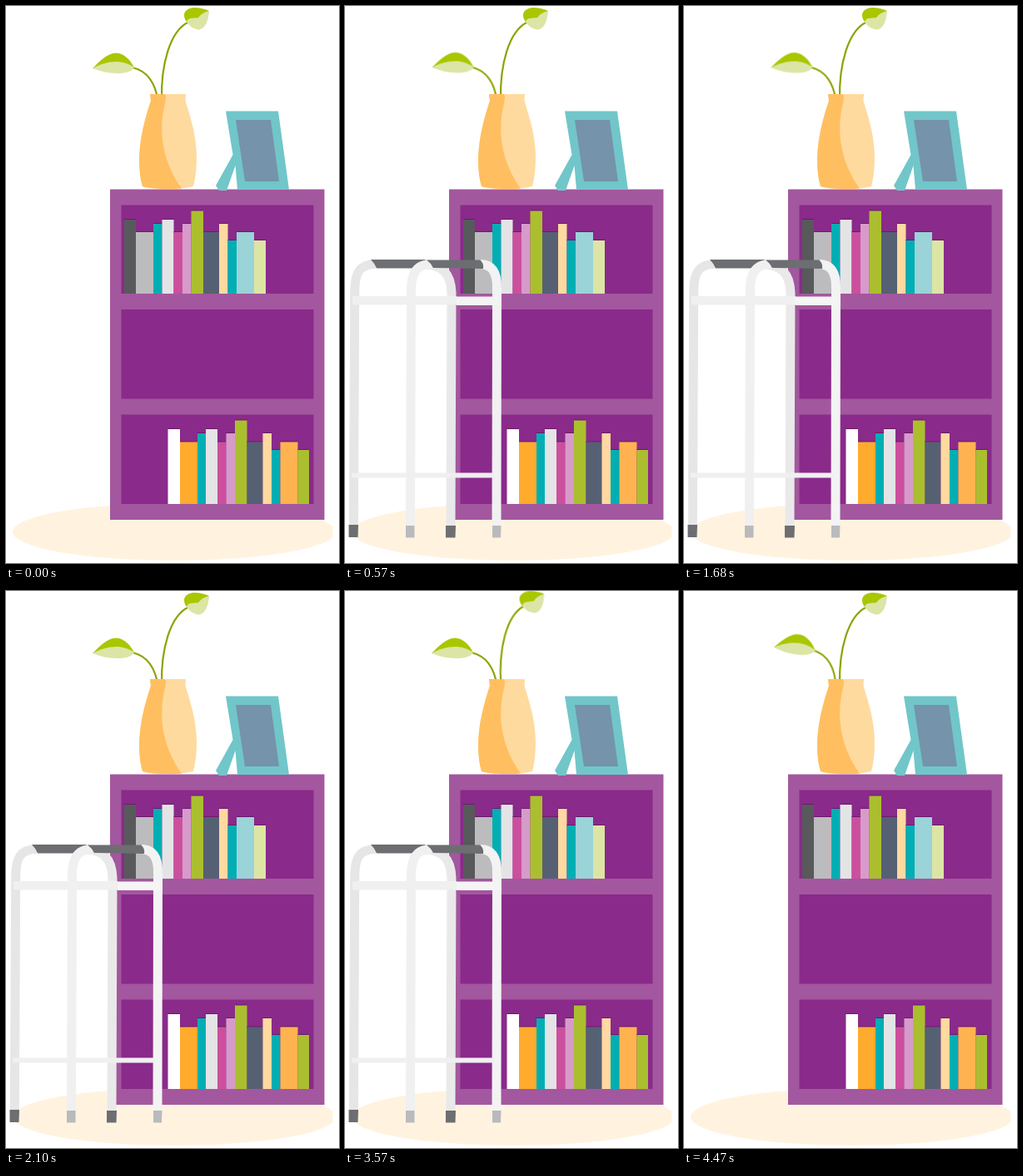
An HTML page for the animation above (4.5 s loop, 400 by 670 pixels).

```html
<!DOCTYPE html>
<html lang="en">
<head>
<meta charset="utf-8">
<title>Bookcase and walking frame</title>
<style>
  html, body { margin: 0; width: 100%; height: 100%; overflow: hidden; background: #fff; }
  svg { display: block; width: 100%; height: 100%; }
  .walker { animation: fade 4.5s linear infinite; }
  .sprig { animation: 4.5s ease-in-out infinite; }
  .left { transform-origin: 182px 112px; animation-name: sway-left; }
  .right { transform-origin: 187px 106px; animation-name: sway-right; }
  .stem { fill: none; stroke: #8ea300; stroke-width: 2.2; }
  .leaf { fill: #aac600; }
  .pale { fill: #dce5a5; }
  .tube { fill: none; stroke-width: 11; }
  .dark { fill: #6d6e71; }
  .grey { fill: #b9babc; }

  @keyframes fade {
    0%, .3% { opacity: 0; }
    12.8%, 88.67% { opacity: 1; }
    99.33%, 100% { opacity: 0; }
  }
  @keyframes sway-left {
    0% { transform: rotate(0deg); }
    6.5% { transform: rotate(24deg); }
    13.6%, 36.8% { transform: rotate(0deg); }
    41.8% { transform: rotate(24deg); }
    46.67%, 86% { transform: rotate(0deg); }
    93.9% { transform: rotate(24deg); }
    100% { transform: rotate(5deg); }
  }
  @keyframes sway-right {
    0%, 12.67% { transform: rotate(0deg); }
    15% { transform: rotate(-3deg); }
    18.5% { transform: rotate(9deg); }
    22%, 52% { transform: rotate(0deg); }
    54.3% { transform: rotate(-3deg); }
    57.8% { transform: rotate(9deg); }
    61.33%, 77.3% { transform: rotate(0deg); }
    80% { transform: rotate(-3deg); }
    84.5% { transform: rotate(9deg); }
    88.67%, 100% { transform: rotate(0deg); }
  }
</style>
</head>
<body>
<svg viewBox="0 0 400 670">
  <ellipse cx="202" cy="632.5" rx="194" ry="34.5" fill="#fff3e0"/>
  <path fill="#fff" d="M392.5 590h8v80h-8z"/>

  <path fill="#a3579e" d="M125 220.5H382.500V618H125z"/>
  <path fill="#8a2a8a" d="M138.500 239.500H369.500V346H138.500zM138.500 365H369.500V472.500H138.500zM138.500 491.500H369.500V599H138.500z"/>
  <g id="books"></g>

  <g class="sprig left">
    <path class="stem" d="M183 116Q178 80 152 74"/>
    <path class="leaf" d="M104 75C112 67 121 57 132 56.500C143 57 150 66 154 74L130 76z"/>
    <path class="pale" d="M104 75C120 66 140 63 154 74C150 80 142 81 134 81C122 81 112 78 104 75z"/>
  </g>
  <g class="sprig right">
    <path class="stem" d="M187 114C186 70 197 30 219 19.500"/>
    <path class="leaf" d="M217 19C214 15 214 12 214 10C215 4 222 1.500 228 2C235 2.500 240 4 244 6L231 17z"/>
    <path class="pale" d="M217 19C219 13 226 15 231 14Q235 8 244 6C243 17 240 28 231 28.500C224 27 219 23 217 19z"/>
  </g>

  <path fill="#ffda9e" d="M173 106H216L215.500 114C222 135 229 157 229 182Q229 202 225 217Q214 220 195 220Q172 220 164 217Q160 205 160 183C161 157 167 135 174 114z"/>
  <path fill="#ffbf60" d="M173 106H191Q193 109 191 117C183 149 187 186 211 219.500Q203 220 195 220Q172 220 164 217Q160 205 160 183C161 157 167 135 174 114z"/>

  <path fill="#71c6c9" d="M264 126.500H327L340 221H278L275.500 192L265 222H256L252 216L272.500 179z"/>
  <path fill="#7593aa" d="M276 137H318L328 211H287z"/>

  <g class="walker">
    <path class="tube" stroke="#e6e6e7" d="M10.300 625L11.700 345C11.500 321 17 310.500 37 310.500"/>
    <path class="tube" stroke="#e9e9ea" d="M127 625L128 345C127 322 118 311 92 310.500"/>
    <path class="dark" d="M31 305H97L88 315.500H38Q36 310 31 305z"/>
    <path class="tube" stroke="#f0f0f1" stroke-width="10" d="M78.500 625L79.500 345C79 322 85 310.500 104 310.500"/>
    <path class="tube" stroke="#f3f3f4" d="M182 625L182.500 340C183 320 176 311 163 310.500"/>
    <path class="dark" d="M98 305.500H162Q167 309 166 316L106 315Q103 309 98 305.500z"/>
    <path fill="#f0f0f1" d="M9 349H134V359.500H9zM8 561.500H179V567.500H8z"/>
    <path fill="#f5f5f6" d="M134 349.500H188V360H134z"/>
    <path class="dark" d="M4.500 624H16L15.500 639H4.500zM121 625H133L132.500 639.500H121z"/>
    <path class="grey" d="M73 625H83.500V639.500H73zM177 625H187.500L187 639.500H177z"/>
  </g>
</svg>
<script>
  const teal = '#00aeb3', pink = '#cc4f9e', lilac = '#d79bcb', olive = '#abbf2e',
        slate = '#566073', peach = '#ffd9a0', silver = '#e4e4e6';
  const shelf = document.getElementById('books');

  function rect(x, y, width, height, fill) {
    const el = document.createElementNS('http://www.w3.org/2000/svg', 'rect');
    for (const [key, val] of Object.entries({ x, y, width, height, fill })) el.setAttribute(key, val);
    shelf.append(el);
  }

  // Each book: width, height, colour
  function stack(x, base, books) {
    for (const [w, h, fill] of books) {
      rect(x, base - h - 1, w, 1.2, '#6b1a6c');
      rect(x, base - h, w, h, fill);
      x += w;
    }
  }

  stack(142, 346, [
    [14, 89, '#58595b'], [21, 74, '#bcbcbe'], [10.5, 84, teal], [14, 89, silver],
    [10.5, 74, pink], [10.5, 84, lilac], [14.5, 99.5, olive], [19, 74, slate],
    [10.5, 84, peach], [10.5, 64, teal], [21, 74, '#9ad3d8'], [14, 64, '#dde5a5']
  ]);
  stack(194.5, 599, [
    [14.5, 90, '#fff'], [21, 74.5, '#ffab2e'], [10, 85, teal], [14, 90, silver],
    [10.5, 74.5, pink], [10.5, 85, lilac], [14.5, 100.5, olive], [19, 74.5, slate],
    [10.5, 85, peach], [10.5, 65, teal], [21, 74.5, '#ffb350'], [13.5, 65, olive]
  ]);
</script>
</body>
</html>
```
